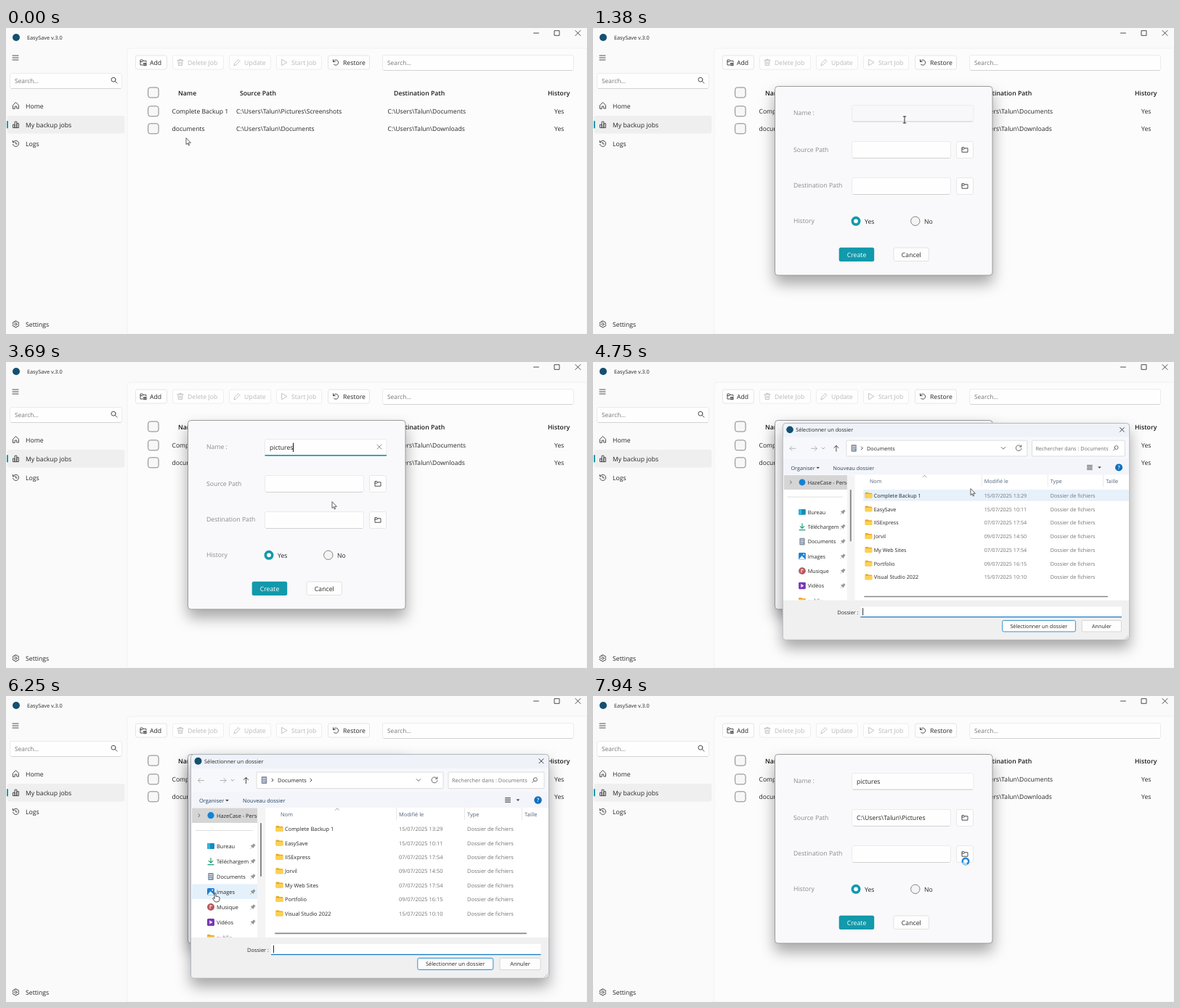
An HTML page for the animation above (8000 ms loop, 800 by 422 pixels).

```html
<!DOCTYPE html>
<html lang="en">
<head>
<meta charset="utf-8">
<title>Backup jobs</title>
<style>
  html, body { margin: 0; width: 100%; height: 100%; overflow: hidden; background: #fafafa; }
  svg { display: block; width: 800px; height: 422px; }
  text { font: 8.7px "Open Sans", "Noto Sans", sans-serif; fill: #262626; text-rendering: geometricPrecision; white-space: pre; }
  .b { font-weight: 600; fill: #1c1c1c; }
  .row { font-size: 8.6px; }
  .off { fill: #b9b9b9; }
  .hint { fill: #767676; font-size: 8.4px; }
  .label { fill: #8b8b8b; }
  .raised { filter: drop-shadow(0 11px 10px rgba(0, 0, 0, .34)); }
  #picker text { font-size: 7.45px; }
  #picker .dim { fill: #737373; }
  #picker .head { fill: #52627c; }
  #picker .tool { fill: #25405f; }
</style>
</head>
<body>
<svg id="stage" viewBox="0 0 800 422" xmlns="http://www.w3.org/2000/svg"></svg>
<script>
const LOOP = 8000, TEAL = '#1299ab', BLUE = '#0a6fc2', INK = '#3a3a3a';
const USER = 'C:\\Users\\Talun\\';

// Markup helpers
const text = (x, y, s, cls = '', extra = '') => `<text x="${x}" y="${y}" class="${cls}" ${extra}>${s}</text>`;
const rect = (x, y, w, h, fill, r = 0, stroke = 'none', extra = '') =>
  `<rect x="${x}" y="${y}" width="${w}" height="${h}" rx="${r}" fill="${fill}" stroke="${stroke}" ${extra}/>`;
const dot = (x, y, r, fill, stroke = 'none', w = 1, extra = '') =>
  `<circle cx="${x}" cy="${y}" r="${r}" fill="${fill}" stroke="${stroke}" stroke-width="${w}" ${extra}/>`;
const icon = (x, y, d, color = INK, w = 0.9, fill = 'none', extra = '') =>
  `<path transform="translate(${x} ${y})" d="${d}" fill="${fill}" stroke="${color}" stroke-width="${w}" stroke-linecap="round" stroke-linejoin="round" ${extra}/>`;
const group = (id, body) => `<g id="${id}">${body}</g>`;

const shape = {
  menu: 'M-4-3H4M-4 0H4M-4 3H4',
  find: 'M1.3 1.3L4 4M2-1A3 3 0 1 1-4-1A3 3 0 1 1 2-1',
  home: 'M-4 4V-.5L0-4.5L4-.5V4H1.3V1H-1.3V4Z',
  bars: 'M-4 4V0H-1.4V4ZM-1.4 4V-4H1.4V4ZM1.4 4V-1.5H4V4Z',
  clock: 'M-3.6-2A4.1 4.1 0 1 1-4 1M-4.2-4V-1.6H-1.8M0-2V.5H1.8',
  gear: 'M-1-4.4H1L1.6-3L3.2-3.2L4.3-1.4L3.3 0L4.3 1.4L3.2 3.2L1.6 3L1 4.4H-1L-1.6 3L-3.2 3.2L-4.3 1.4L-3.3 0L-4.3-1.4L-3.2-3.2L-1.6-3ZM1.5 0A1.5 1.5 0 1 1-1.5 0A1.5 1.5 0 1 1 1.5 0',
  folder: 'M-4 3.2V-3H-1L0-1.8H4V3.2ZM-4-.6H-1L0-1.8',
  addFolder: 'M-1 3.5H-4V-3.5H-1L0-2.2H4V-.5M-4-1H-1L0-2.2M.6 1H4.2V4.2H.6ZM2.4 1.8V3.4M1.6 2.6H3.2',
  bin: 'M-4-3H4M-1.3-3V-4.2H1.3V-3M-3.2-3L-2.5 4H2.5L3.2-3M-1-1V2.2M1-1V2.2',
  pen: 'M-4 4L-3.2 1L2-4L4-2L-1 3.2Z',
  play: 'M-3-4L4 0L-3 4Z',
  undo: 'M-3.5-3.8V-1H-.8M-3.3-1.2A3.6 3.6 0 1 1-2.6 2.6',
  cross: 'M-3-3L3 3M3-3L-3 3',
  down: 'M-2.8-1.4L0 1.4L2.8-1.4',
  right: 'M-1-2L1 0L-1 2',
  caret: 'M-2-1H2L0 1.2Z',
  back: 'M4 0H-4M-1-3.2L-4 0L-1 3.2',
  reload: 'M3.5-2.2A4 4 0 1 0 4 .5M3.8-4.2V-1.8H1.4',
  pin: 'M-3.4 3.4L-1 1M-2.6-.6L.6 2.6L1.4.4L3.2-1.2L1.2-3.2L-.4-1.4Z'
};

// Main window
const field = (x, y, w, h, id = '') =>
  rect(x + .5, y + .5, w - 1, h - 1, '#fefefe', 2.5, '#ebebeb', id && `id="${id}"`) +
  `<path d="M${x + 2} ${y + h - .5}h${w - 4}" stroke="#d2d2d2"/>`;
const button = (x, w, d, label, on) => rect(x + .5, 38, w - 1, 19, '#fefefe', 2.5, on ? '#e5e5e5' : '#eeeeee') +
  icon(x + 11, 47.5, shape[d], on ? INK : '#bdbdbd') + text(x + (w < 50 ? 20 : 21), 50.7, label, on ? '' : 'off');
const check = y => rect(195.7, y - 7, 14.4, 14, '#f7f7f7', 3, '#868686');
const job = (y, name, from, to) => check(y - 3.5) + text(228.5, y, name, 'row') +
  text(317, y, USER + from, 'row') + text(525.5, y, USER + to, 'row') + text(755, y, 'Yes', 'row');
const nav = (y, d, label) => icon(13.5, y, shape[d]) + text(27, y + 3.6, label);

const shell =
  rect(0, 0, 800, 422, '#fafafa') +
  '<path d="M167 422V32Q167 28 171 28H800V422Z" fill="#fcfcfc" stroke="#f1f1f1"/>' +
  dot(14, 13, 5, '#14506f') + text(29, 16, 'EasySave v.3.0', '', 'style="font-size:7.3px"') +
  icon(730, 7, 'M-3.5 0H3.5') + icon(758.7, 7, 'M-3.3-3.3H3.3V3.3H-3.3Z') + icon(787.5, 7, 'M-3.5-3.5L3.5 3.5M3.5-3.5L-3.5 3.5') +
  icon(13, 41, shape.menu) +
  field(5, 62, 155, 22) + text(12, 76, 'Search...', 'hint') + icon(149, 72.2, shape.find, INK, .9) +
  rect(1.5, 121, 162, 24.5, '#efefef', 3) + rect(1, 128, 2, 10.5, TEAL, 1) +
  nav(107, 'home', 'Home') + nav(133.2, 'bars', 'My backup jobs') + nav(159.4, 'clock', 'Logs') + nav(408.5, 'gear', 'Settings') +
  button(178, 44, 'addFolder', 'Add', 1) + button(229, 71, 'bin', 'Delete Job') + button(307, 58, 'pen', 'Update') +
  button(372, 63, 'play', 'Start Job') + button(443, 58, 'undo', 'Restore', 1) +
  field(518, 37, 264, 22) + text(525, 51, 'Search...', 'hint') +
  check(89) + text(237, 92.6, 'Name', 'b') + text(322, 92.6, 'Source Path', 'b') +
  text(534, 92.6, 'Destination Path', 'b') + text(746, 92.6, 'History', 'b') +
  job(118.3, 'Complete Backup 1', 'Pictures\\Screenshots', 'Documents') +
  job(142.3, 'documents', 'Documents', 'Downloads');

// Job form
const browse = y => rect(500.5, y + .5, 23, 23, '#fefefe', 2.5, '#e8e8e8') + icon(512, y + 11.6, shape.folder);
const form =
  rect(250.5, 80.5, 299.5, 260.5, '#f9f9fb', 4, '#9c9c9c', 'class="raised"') +
  text(276, 120.3, 'Name :', 'label') + text(276, 170.5, 'Source Path', 'label') +
  text(276, 220.3, 'Destination Path', 'label') + text(276, 268.6, 'History', 'label') +
  field(356, 106, 168.5, 23.5, 'nameBox') + field(356, 156, 137, 24) + field(356, 206, 137, 24) + browse(156) + browse(206) +
  text(363, 121.3, '', '', 'id="typed"') + text(363, 171.3, USER + 'Pictures', '', 'id="source"') +
  group('focus', rect(356.5, 128, 167.5, 1.6, TEAL) + icon(514, 117, shape.cross, '#888', .9, 'none', 'id="clear"')) +
  rect(395, 111.5, 1, 12.5, '#111', 0, 'none', 'id="caret"') +
  dot(362, 266.3, 4.7, '#fff', TEAL, 3.6) + text(374, 269.6, 'Yes') +
  dot(443.8, 266.3, 6.2, '#f4f4f4', '#858585') + text(456, 269.6, 'No') +
  rect(338.7, 302.7, 48.5, 19.3, TEAL, 2.5) + text(363, 315.6, 'Create', '', 'text-anchor="middle" style="fill:#fff"') +
  rect(414, 303, 48.5, 18.5, '#fefefe', 2.5, '#e2e2e2') + text(438.3, 315.6, 'Cancel', '', 'text-anchor="middle"');

// Folder picker
const ROW = 19.4, SIDE = 21;
const folder = (x, y) => `<path transform="translate(${x} ${y})" d="M-5-3Q-5-4-4-4H-1L0-3H4Q5-3 5-2V3Q5 4 4 4H-4Q-5 4-5 3Z" fill="#e9a925"/>` +
  rect(x - 5, y - 1.6, 10, 5.6, '#fcd152', 1);
const sheet = (x, y) => rect(x - 3.8, y - 5, 7.6, 10, '#8795a8', 1) + icon(x, y, 'M-2-2.5H2M-2 0H2M-2 2.5H1', '#fff', .8);
const photo = (x, y) => rect(x - 5, y - 5, 10, 10, '#1f7fd0', 1.5) + icon(x, y, 'M-4.5 4.5L-.5-.5L4.5 4.5Z', '#e8f5ff', .5, '#e8f5ff') + dot(x + 2.3, y - 2.4, 1, '#fff');
const places = [
  ['Bureau', (x, y) => rect(x - 5, y - 4, 10, 8, '#168bbd', 1) + rect(x - 5, y - 4, 4, 8, '#35b5d8', 1)],
  ['Téléchargem', (x, y) => icon(x, y, 'M0-4.5V2M-2.8-.6L0 2.2L2.8-.6M-4 4.6H4', '#1f9d77', 1.2)],
  ['Documents', sheet], ['Images', photo],
  ['Musique', (x, y) => dot(x, y, 5, '#b9585c') + icon(x, y, 'M-1 2V-2.5L1.5-1.5', '#fff', 1)],
  ['Vidéos', (x, y) => rect(x - 5, y - 5, 10, 10, '#7a36b8', 1.5) + icon(x, y, 'M-1.3-2L2 0L-1.3 2Z', '#fff', .5, '#fff')],
  ['public', folder]
];
const entry = ([name, date], i) => {
  const y = 183.5 + i * ROW;
  return folder(376.5, y - .5) + text(384, y + 2.7, name) + text(541, y + 2.7, date, 'dim') + text(635, y + 2.7, 'Dossier de fichiers', 'dim');
};
const view = (id, title, mark, rows) => group(id, mark(355.5, 116) + text(374, 119.2, title) +
  text(614, 119.3, 'Rechercher dans : ' + title, 'dim') + rows.map(entry).join(''));

const picker =
  rect(254.5, 80.5, 493, 308.5, '#eff3f9', 4, '#b0b5bc', 'class="raised"') +
  dot(264.5, 89.7, 5, '#14506f') + text(273, 92.6, 'Sélectionner un dossier') + icon(737, 89.7, shape.cross, '#222', .9) +
  rect(255, 100, 492, 32, '#f6f8fb') + rect(255, 132, 492, 22.5, '#f3f5fa') +
  icon(268.5, 116.5, shape.back, '#a3a3a3', .8) + icon(299, 116.5, 'M-4 0H4M1-3.2L4 0L1 3.2', '#a3a3a3', .8) +
  icon(312, 116.2, 'M-2-1L0 1L2-1', '#8f8f8f', .8) + icon(330.5, 116.5, 'M0 4V-4M-3.2-1L0-4L3.2-1', '#333', .9) +
  rect(345, 105, 257, 22.5, '#fff', 1, '#dcdcdc') + rect(609, 105, 132, 22.5, '#fff', 1, '#dcdcdc') +
  icon(367, 116, shape.right, '#333') + icon(568, 116, shape.down, '#555') + icon(590, 116, shape.reload, '#555') +
  `<g transform="translate(728 116) scale(-.85 .85)">${icon(0, 0, shape.find, '#444')}</g>` +
  text(266, 147, 'Organiser', 'tool') + icon(304.5, 144, shape.caret, '#333', .2, '#333') + text(326, 147, 'Nouveau dossier', 'tool') +
  icon(691, 143.5, 'M-3.5-3H3.5M-3.5-1H3.5M-3.5 1H3.5M-3.5 3H3.5', '#444') + icon(705, 143.5, shape.caret, '#333', .2, '#333') +
  dot(732.5, 143.5, 5.2, BLUE) + text(732.5, 146.3, '?', 'b', 'text-anchor="middle" style="fill:#fff"') +
  rect(255, 154, 492, 179, '#fff') + rect(346, 154, 11, 179, '#f4f4f5') +
  rect(256, 0, 90, 20.5, '#d5d5d6', 0, 'none', 'id="chosen"') + rect(256, 0, 90, 20.5, '#e4f0fa', 0, 'none', 'id="sideHover"') +
  rect(369, 0, 378, 16, '#e6f1fa', 0, 'none', 'id="rowHover"') +
  '<clipPath id="sideClip"><rect x="254" y="154" width="92" height="178.5"/></clipPath><g clip-path="url(#sideClip)">' +
  icon(266, 164.7, shape.right, '#555') + dot(282, 164.7, 4.6, '#1583d3') + text(290, 167.5, 'HazeCase - Perso') +
  '<path d="M261 185.5H340" stroke="#dedede"/>' +
  places.map(([name, mark], i) => {
    const y = 207 + i * SIDE;
    return mark(282, y) + text(290, y + 2.9, name) + (i < 6 ? icon(340, y, shape.pin, '#777', .5, '#9a9a9a') : '');
  }).join('') + '</g>' + rect(350, 175, 2, 74, '#888', 1) +
  [['Nom', 378], ['Modifié le', 541], ['Type', 635], ['Taille', 714]].map(([s, x], i) =>
    text(x, 165.5, s, 'head') + (i ? rect(x - 4, 154, .8, 17, '#e3e3e3') : '')).join('') +
  icon(456, 156, 'M-2.5 1.2L0-1.2L2.5 1.2', '#777', .7) +
  view('docs', 'Documents', sheet, [
    ['Complete Backup 1', '15/07/2025 13:29'], ['EasySave', '15/07/2025 10:11'], ['IISExpress', '07/07/2025 17:54'],
    ['Jorvil', '09/07/2025 14:50'], ['My Web Sites', '07/07/2025 17:54'], ['Portfolio', '09/07/2025 16:15'],
    ['Visual Studio 2022', '15/07/2025 10:10']]) +
  view('pics', 'Images', photo, [['Captures d’écran', '15/07/2025 10:11'], ['Pellicule', '07/07/2025 17:54']]) +
  icon(420, 116, shape.right, '#333', .9, 'none', 'id="trail"') +
  rect(370, 326.6, 347, 1.7, '#888', .8) +
  '<path d="M255 333H747V385Q747 388.5 743 388.5H259Q255 388.5 255 385Z" fill="#f0f0f1"/>' +
  text(332, 352.6, 'Dossier :') + rect(365, 342, 371.5, 14.3, '#fff') + rect(365, 355.9, 371.5, 1.3, '#1a7cc4') +
  rect(368, 343.8, .9, 10.5, '#111', 0, 'none', 'id="pickCaret"') +
  rect(566.8, 361.5, 104, 16, '#fdfdfd', 2, '#2f8fd0') + text(618.6, 372.2, 'Sélectionner un dossier', '', 'text-anchor="middle"') +
  rect(680, 361.5, 56, 16, '#fdfdfd', 2, '#d6d6d6') + text(708, 372.2, 'Annuler', '', 'text-anchor="middle"') +
  icon(743.5, 385.5, 'M2-2V-2M0 0V0M2 0V0M-2 2V2M0 2V2M2 2V2', '#999', 1);

// Pointers, each with its hot spot at 0,0
const pointers =
  group('arrow', icon(0, 0, 'M0 0V8.6L2 6.8L3.4 10L4.6 9.5L3.3 6.3H6Z', '#222', .7, '#fff')) +
  group('beam', icon(0, 0, 'M-1.8-4.5H1.8M0-4.5V4.5M-1.8 4.5H1.8', '#222', .9)) +
  group('hand', icon(0, 0, 'M-1 7V1Q-1-.6 0-.6Q1-.6 1 1V4.5Q2.5 3.6 3 4.8Q4.5 4.2 4.8 5.3Q6 5 6 6.4V9Q5.6 12 3 12H1Q-.6 12-1.6 10L-3.4 7.4Q-3 5.8-1 7Z', '#222', .8, '#fff')) +
  group('busy', dot(0, 0, 4.2, 'none', '#2487d6', 2.5) + dot(0, 0, 4.2, 'none', '#9ad4f7', 2.5, 'stroke-dasharray="7 30"'));

const stage = document.getElementById('stage');
stage.innerHTML = shell + group('form', form) + group('picker', picker) + group('pointer', pointers);
const ui = {};
stage.querySelectorAll('[id]').forEach(el => ui[el.id] = el);

// Timeline
const at = { form: 620, focus: 1560, type: 1850, typed: 3300, browse: 4130, pick: 4660, images: 6430, close: 7150, busy: 7790 };
const path = [
  [0, 248, 152], [60, 248, 152], [460, 203, 48], [760, 206, 50], [1330, 429, 126.5], [3400, 429, 126.5],
  [3690, 449, 193], [4060, 512, 168], [4250, 512, 168], [4750, 520, 175], [5250, 490, 206], [6120, 288, 272],
  [6520, 288, 272], [7000, 618, 367], [7180, 618, 367], [7680, 513, 228], [LOOP, 513, 228]
];
const clamp = v => Math.max(0, Math.min(1, v));
const span = (t, a, b) => clamp((t - a) / (b - a));
const smooth = p => p * p * (3 - 2 * p);
const show = (el, on) => el.style.display = on ? '' : 'none';
const blink = (t, from) => (t - from) % 1060 < 530;

function pointerAt(t) {
  const i = path.findIndex(p => p[0] > t);
  const [t0, x0, y0] = path[i - 1], [t1, x1, y1] = path[i], p = smooth(span(t, t0, t1));
  return [x0 + (x1 - x0) * p, y0 + (y1 - y0) * p];
}

function hover(el, i, count, top, step) {
  const on = i >= 0 && i < count;
  show(el, on);
  if (on) el.setAttribute('y', top + i * step);
}

function render(t) {
  const [x, y] = pointerAt(t);
  const picking = t >= at.pick && t < at.close + 130;
  const focused = t >= at.focus && t < at.browse;

  show(ui.form, t >= at.form);
  ui.form.style.opacity = span(t, at.form, at.form + 130);
  const count = t < at.type ? 0 : Math.min(8, 1 + Math.floor((t - at.type) / (at.typed - at.type) * 7));
  ui.typed.textContent = 'pictures'.slice(0, count);
  show(ui.focus, focused);
  show(ui.clear, count > 0);
  const typing = t > at.type && t < at.typed;
  show(ui.caret, focused && (typing || blink(t, t < at.type ? at.focus : at.typed)));
  ui.caret.setAttribute('x', 362.6 + (count ? ui.typed.getComputedTextLength() : 0));
  const overName = x > 356 && x < 524 && y > 106 && y < 130;
  ui.nameBox.setAttribute('fill', overName && !focused ? '#f8f8fa' : '#fefefe');
  show(ui.source, t >= at.close);

  show(ui.picker, picking);
  if (picking) {
    const grow = t < 4750 ? .92 + .048 * span(t, at.pick, 4750) : .968 + .032 * smooth(span(t, 4750, 4870));
    const gone = span(t, at.close, at.close + 130);
    const scale = grow - .08 * gone, shift = (scale - 1) * 31;
    ui.picker.setAttribute('transform', `translate(${500.5 + shift} ${234.5 + shift}) scale(${scale}) translate(-500.5 -234.5)`);
    ui.picker.style.opacity = Math.min(span(t, at.pick, 4740), 1 - gone);
    const images = t >= at.images;
    show(ui.docs, !images);
    show(ui.pics, images);
    show(ui.trail, t > 4850);
    ui.trail.setAttribute('transform', `translate(${images ? 407 : 420} 116)`);
    ui.chosen.setAttribute('y', images ? 259.5 : 154.5);
    const side = x > 256 && x < 346 ? Math.floor((y - 196.5) / SIDE) : -1;
    const row = x > 369 && x < 747 ? Math.floor((y - 174) / ROW) : -1;
    hover(ui.sideHover, images ? -1 : side, 6, 259.5 - 3 * SIDE, SIDE);
    hover(ui.rowHover, row, images ? 2 : 7, 175.2, ROW);
    show(ui.pickCaret, !images && blink(t, 4690));
  }

  const kind = t >= at.busy ? 'busy' : picking && x < 346 ? 'hand' : overName && t > at.form && t < at.pick ? 'beam' : 'arrow';
  for (const k of ['arrow', 'beam', 'hand', 'busy']) show(ui[k], k === kind);
  ui.busy.setAttribute('transform', `rotate(${(t - at.busy) * .4})`);
  ui.pointer.setAttribute('transform', `translate(${x} ${y})`);
}

const start = performance.now();
(function tick() {
  render((performance.now() - start) % LOOP);
  requestAnimationFrame(tick);
})();
</script>
</body>
</html>
```
